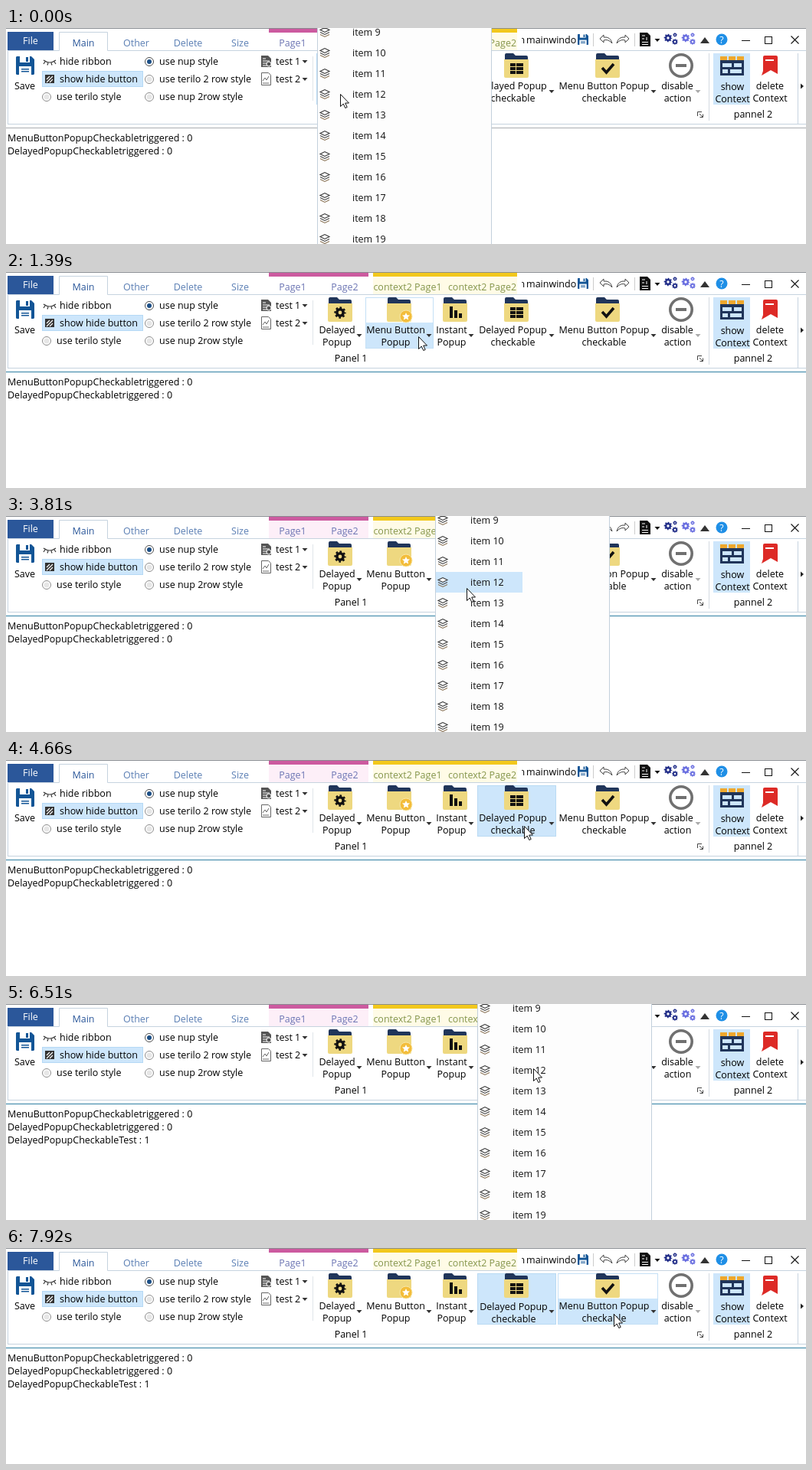
These frames come from a looping animation (1044 px wide and 282 px high, 8000 ms). An HTML page:

```html
<!DOCTYPE html>
<html lang="en">
<head>
<meta charset="utf-8">
<title>Ribbon popup menus</title>
<style>
html, body { margin: 0; width: 100%; height: 100%; overflow: hidden; background: #fff; }
svg { display: block; }
text { font: 12.5px "Open Sans", "Noto Sans", sans-serif; white-space: pre; }
.mid { text-anchor: middle; }
</style>
</head>
<body>
<svg id="stage" width="1044" height="282" viewBox="0 0 1044 282" xmlns="http://www.w3.org/2000/svg"></svg>
<script>
const LOOP = 8000;
const NAVY = '#20355a', BLUE = '#2b579a', PALE = '#cde6fb', EDGE = '#c6d3df';

const rect = (x, y, w, h, fill, more = '') =>
  `<rect x="${x}" y="${y}" width="${w}" height="${h}" fill="${fill}" ${more}/>`;
const box = (x, y, w, h, stroke, fill = 'none') =>
  rect(x + .5, y + .5, w - 1, h - 1, fill, `stroke="${stroke}"`);
const path = (d, fill = 'none', stroke = 'none', width = 1) =>
  `<path d="${d}" fill="${fill}" stroke="${stroke}" stroke-width="${width}"/>`;
const circle = (x, y, r, fill, stroke = 'none', width = 1) =>
  `<circle cx="${x}" cy="${y}" r="${r}" fill="${fill}" stroke="${stroke}" stroke-width="${width}"/>`;
const text = (x, y, s, fill = '#000') => `<text x="${x}" y="${y}" fill="${fill}">${s}</text>`;
const mid = (x, y, s, fill = '#000') => `<text class="mid" x="${x}" y="${y}" fill="${fill}">${s}</text>`;
const at = (x, y, s) => `<g transform="translate(${x} ${y})">${s}</g>`;
const group = (id, s) => `<g id="${id}" visibility="hidden">${s}</g>`;
const down = (x, y, fill = '#333') => path(`M${x - 3.5} ${y - 2}h7l-3.5 4z`, fill);
const gear = (x, y, r, fill, hole) =>
  circle(x, y, r * .58, hole, fill, r * .5) +
  `<circle cx="${x}" cy="${y}" r="${r * .9}" fill="none" stroke="${fill}" stroke-width="${r * .34}" ` +
  `stroke-dasharray="${r * .353}" stroke-dashoffset="${r * .17}"/>`;

function floppy(x, y, s) {
  return `<g transform="translate(${x} ${y}) scale(${s / 24})">` +
    path('M1 0h19l4 4v19l-1 1H1l-1-1V1z', '#125596') +
    rect(5, 0, 13, 8, '#fff') + rect(13, 1, 3, 6, '#125596') +
    rect(4, 13, 16, 11, '#fff') + rect(7, 16, 10, 1.5, '#125596') + rect(7, 19, 10, 1.5, '#125596') + '</g>';
}

const folder = (x, mark) => at(x, 33,
  path('M1 11V2q0-2 2-2h9l3 3h14q2 0 2 2v6z', NAVY) +
  path('M0 8h32v22q0 2-2 2H2q-2 0-2-2z', '#eed880') + mark);

const marks = {
  gear: gear(16, 20, 7.2, '#111', '#eed880'),
  star: circle(25, 25, 8, '#f3bd3a', '#f8e7a8') +
    path('M25 20l1.5 3.2 3.5.4-2.6 2.4.7 3.5-3.1-1.7-3.1 1.7.7-3.5-2.6-2.4 3.5-.4z', '#fff'),
  bars: rect(9, 12, 4, 15, '#111') + rect(15, 17, 4, 10, '#111') + rect(21, 21, 4, 6, '#111'),
  grid: [0, 1, 2].map(r => rect(8, 13 + r * 5, 7, 4, '#111') + rect(16, 13 + r * 5, 9, 4, '#111')).join(''),
  tick: path('M9 19l5.5 6L24 14', 'none', '#111', 3.6)
};

// left edge, width, label centre, folder left, arrow x, two label lines, mark
const buttons = [
  [405, 62, 432, 420, 461, 'Delayed', 'Popup', 'gear'],
  [469, 89, 508.5, 497, 552, 'Menu Button', 'Popup', 'star'],
  [560, 53, 581.5, 570, 607, 'Instant', 'Popup', 'bars'],
  [615, 103, 661.5, 650, 712, 'Delayed Popup', 'checkable', 'grid'],
  [720, 131, 780.5, 769, 845, 'Menu Button Popup', 'checkable', 'tick']
];

function hoverBox([x, w], i) {
  const split = i === 1 || i === 4;
  return split
    ? box(x, 33, w, 67, '#c4e0f6', '#fff') + rect(x + 1, 66, w - 2, 33, PALE)
    : box(x, 33, w, 67, '#b9daf3', PALE);
}

const radio = (x, y, on) => circle(x, y, 5.5, '#fff', on ? '#4d4d4d' : '#8c8c8c') +
  (on ? circle(x, y, 3, '#1c4f86') : circle(x, y, 3.5, '#e6e6e6'));

function tabs() {
  return rect(0, 0, 1044, 1, '#8b8f94') +
    rect(2, 5, 60, 24, BLUE) + mid(32, 21, 'File', '#fff') +
    path('M2.5 125V29.5H69.5V5.5H132.5V29.5H1044', 'none', EDGE) +
    mid(101, 24, 'Main', BLUE) +
    [[170, 'Other'], [237.5, 'Delete'], [305.5, 'Size']].map(([x, s]) => mid(x, 24, s, '#5b7fb4')).join('') +
    group('tint', rect(343, 6, 130, 23, '#fdeff8')) +
    rect(343, 1, 130, 5, '#cc5a9f') + rect(479, 1, 188, 5, '#f2c81c') +
    rect(479, 6, 188, 23, '#fffbe6') +
    mid(374, 24, 'Page1', '#6d76b4') + mid(442, 24, 'Page2', '#6d76b4') +
    mid(524, 24, 'context2 Page1', '#84954b') + mid(621.5, 24, 'context2 Page2', '#84954b');
}

function titleBar() {
  const undo = path('M6 1L1 6l5 5V8q6-2 11 4-2-9-11-8z', '#fff', '#444');
  const gears = (x, c) => gear(x + 6, 13, 5, c, '#fff') + gear(x + 15, 18, 3.6, c, '#fff') + gear(x + 15, 9, 2.6, c, '#fff');
  return '<svg x="673" y="0" width="71" height="29">' + text(-3.5, 20, 'n') + text(6, 20, 'mainwindo') + '</svg>' +
    floppy(746, 8, 14) + rect(766, 7, 1, 17, '#ccc') +
    at(774, 8, undo) + `<g transform="translate(814 8) scale(-1 1)">${undo}</g>` + rect(820, 7, 1, 17, '#ccc') +
    path('M827 6h10l4 4v14h-14z', '#111') +
    path('M830 10h4M830 14h3M830 18.500h8M830 21.500h8M836 12v4', 'none', '#fff') +
    down(850, 16, '#111') + gears(858, '#24308a') + gears(881, '#6a6fe0') +
    path('M906 20l6-8 6 8z', '#333') +
    circle(934, 15, 7.5, '#1f8fe6') + `<text class="mid" x="934" y="20" fill="#fff" font-weight="700">?</text>` +
    rect(960, 16, 11, 1, '#111') + box(990, 11, 10, 10, '#111') +
    path('M1024.500 10.500l10 10M1034.500 10.500l-10 10', 'none', '#111', 1.1);
}

function smallTools() {
  return floppy(13, 37, 24) + mid(24.5, 80, 'Save') +
    path('M49 42q8 6 16 0M51 44l-2 3M55 45.500l-1 3M59 45.500l1 3M63 44l2 3', 'none', '#333', 1.2) +
    text(70, 48, 'hide ribbon') +
    box(47, 56, 132, 21, '#b5d9f5', PALE) + rect(51, 61, 12, 11, '#333') +
    path('M53 67l4-4M53 71l8-8M57 71l4-4', 'none', '#fff', 1.1) + text(70, 71, 'show hide button') +
    radio(53, 90) + text(66, 94, 'use terilo style') +
    radio(187, 44, true) + text(200, 48, 'use nup style') +
    radio(187, 67) + text(200, 71, 'use terilo 2 row style') +
    radio(187, 90) + text(200, 94, 'use nup 2row style') +
    path('M333 36h9l4 4v11h-13z', '#555') +
    path('M335 40h4M335 43h9M335 46h9M335 49h6', 'none', '#fff') +
    circle(343, 47, 3, '#555', '#fff') +
    path('M333.500 58.500h9l3 3v13h-12z', '#fff', '#666') +
    path('M335 69l3-4 2 3 3-5M335 72h8', 'none', '#666') +
    text(352, 48, 'test 1') + down(390, 44) + text(352, 71, 'test 2') + down(390, 67) +
    rect(400, 37, 1, 58, '#dfe5ea');
}

function bigTools() {
  return buttons.map((b, i) => {
    const [, , cx, fx, ax, top, bottom, mark] = b;
    return group('hover' + i, hoverBox(b, i)) + folder(fx, marks[mark]) +
      `<g id="label${i}">${mid(cx, 80, top) + mid(cx, 96, bottom)}</g>` + down(ax, 83);
  }).join('') +
    circle(881, 49, 14.2, '#fff', '#707070', 3.6) + rect(874, 47, 14, 4, '#707070') +
    mid(876, 80, 'disable') + mid(876.5, 96, 'action') + down(903, 83, '#aaa') +
    rect(923, 33, 48, 67, PALE) +
    rect(932, 37, 9, 6, '#efa82d') + rect(943, 37, 9, 6, '#efa82d') + rect(954, 37, 9, 6, '#efa82d') +
    rect(932, 42, 31, 20, NAVY) +
    [[935, 46, 12], [950, 46, 10], [935, 54, 7], [945, 54, 15]].map(([x, y, w]) => rect(x, y, w, 5, PALE)).join('') +
    mid(948, 81, 'show') + mid(948, 97, 'Context') +
    path('M990 36h15q2 0 2 2v22l-9-5-12 7 2-6V38q0-2 2-2z', '#dd2a26') + rect(991, 41, 11, 2, '#fff') +
    mid(997, 80, 'delete') + mid(997, 96, 'Context') +
    mid(450, 117, 'Panel 1') + mid(975, 117, 'pannel 2') +
    path('M902.500 115V109.500H908M905 112l4 4M909.500 112.500v4h-4', 'none', '#444') +
    rect(917, 33, 1, 88, '#d3dae1') + rect(1033, 33, 1, 92, EDGE) +
    path('M1037 72.500l4 3.500-4 3.500z', '#222') +
    rect(2, 125, 1042, 1, EDGE);
}

function menu() {
  const layers = path('M0-2.500L6-5.500 12-2.500 6 .500z', '#fff', '#333', 1.1) +
    path('M0 .500L6 3.500 12 .500', 'none', '#444', 1.1) + path('M0 3.500L6 6.500 12 3.500', 'none', '#8a7458', 1.1);
  let rows = '';
  for (let n = 9; n < 20; n++) {
    const y = 5 + (n - 9) * 27;
    rows += at(4, y, layers) + text(46, y + 5, 'item ' + n, '#111');
  }
  return rect(0, -2, 228, 290, '#fdfdfd') + box(0, -2, 228, 290, '#c3d0dc') +
    group('pick', rect(1, 73, 113, 27, PALE)) + rows;
}

const arrow = path('M.5.5V16.500L4.200 13l2.600 5.500 2.400-1.100L6.700 12h4.800z', '#fff', '#111');
const beam = path('M-3.500-7.500h2.500l1 1 1-1h2.500M0-6.500v13M-3.500 7.500h2.500l1-1 1 1h2.500', 'none', '#111', 1.1);

document.getElementById('stage').innerHTML =
  rect(0, 0, 1044, 282, '#fff') + tabs() + titleBar() + smallTools() + bigTools() +
  '<rect id="rule" x="0" y="130" width="1044" height="1"/>' +
  text(2, 148, 'MenuButtonPopupCheckabletriggered : 0') +
  text(2, 165, 'DelayedPopupCheckabletriggered : 0') +
  group('log', text(2, 182, 'DelayedPopupCheckableTest : 1')) +
  '<rect id="caret" width="1" height="16" fill="#111"/>' +
  group('menu', menu()) + group('arrow', arrow) + group('beam', beam);

const $ = id => document.getElementById(id);
const show = (id, on) => on ? $(id).removeAttribute('visibility') : $(id).setAttribute('visibility', 'hidden');
const move = (id, x, y) => $(id).setAttribute('transform', `translate(${x} ${y})`);
const within = (t, spans) => spans.some(([a, b]) => t >= a && t < b);

// time, x, y; below the ribbon the pointer is a text beam
const pointer = [
  [0, 436, 86], [140, 425, 98], [280, 392, 128], [420, 370, 156], [700, 395, 157], [840, 428, 154],
  [1120, 468, 139], [1250, 512, 98], [1390, 538, 84],
  [2220, 470, 142], [2370, 423, 155], [2520, 445, 181],
  [2800, 510, 150], [2930, 574, 96], [3070, 594, 84], [3810, 601, 94],
  [4090, 545, 158], [4360, 610, 142], [4500, 652, 97], [4650, 676, 86], [4930, 685, 82],
  [5790, 698, 84], [5940, 704, 85], [6080, 688, 84],
  [6940, 655, 158], [7190, 705, 140], [7500, 768, 92], [7650, 784, 76], [7920, 793, 86]
];
const menus = [[0, 420, 406], [1660, 2220, 469], [3380, 4090, 560], [6510, 6940, 615]];
const hovers = [
  [[0, 420]], [[1250, 2220]], [[2930, 4090]], [[4500, LOOP]], [[7500, LOOP]]
];
const caretOn = [
  [560, 840], [1120, 1390], [2220, 2800], [4090, 4650], [5790, 6510], [6940, 7500]
];

function draw(t) {
  const [, x, y] = pointer.filter(p => p[0] <= t).pop();
  const open = menus.find(([a, b]) => t >= a && t < b);
  const isBeam = y > 131 && !open;
  show('arrow', !isBeam);
  show('beam', isBeam);
  move('arrow', x, y);
  move('beam', x + .5, y + .5);

  show('menu', open);
  if (open) move('menu', open[2], 0);
  show('pick', open && t >= 3810 && t < 4090);
  hovers.forEach((spans, i) => show('hover' + i, within(t, spans)));

  // a pressed or checked button sinks its label by one pixel
  const sunk = t >= 4790 ? 1 : 0;
  move('label3', sunk, sunk);

  const logged = t >= 4930;
  show('log', logged);
  $('caret').setAttribute('x', logged ? 189 : 220);
  $('caret').setAttribute('y', logged ? 170 : 153);
  show('caret', within(t, caretOn));
  show('tint', t >= 2220 && t < 6940);
  $('rule').setAttribute('fill', t < 420 ? '#a9adb1' : '#2f7fa3');
}

const start = performance.now();
function tick() {
  draw((performance.now() - start) % LOOP);
  requestAnimationFrame(tick);
}
tick();
</script>
</body>
</html>
```
